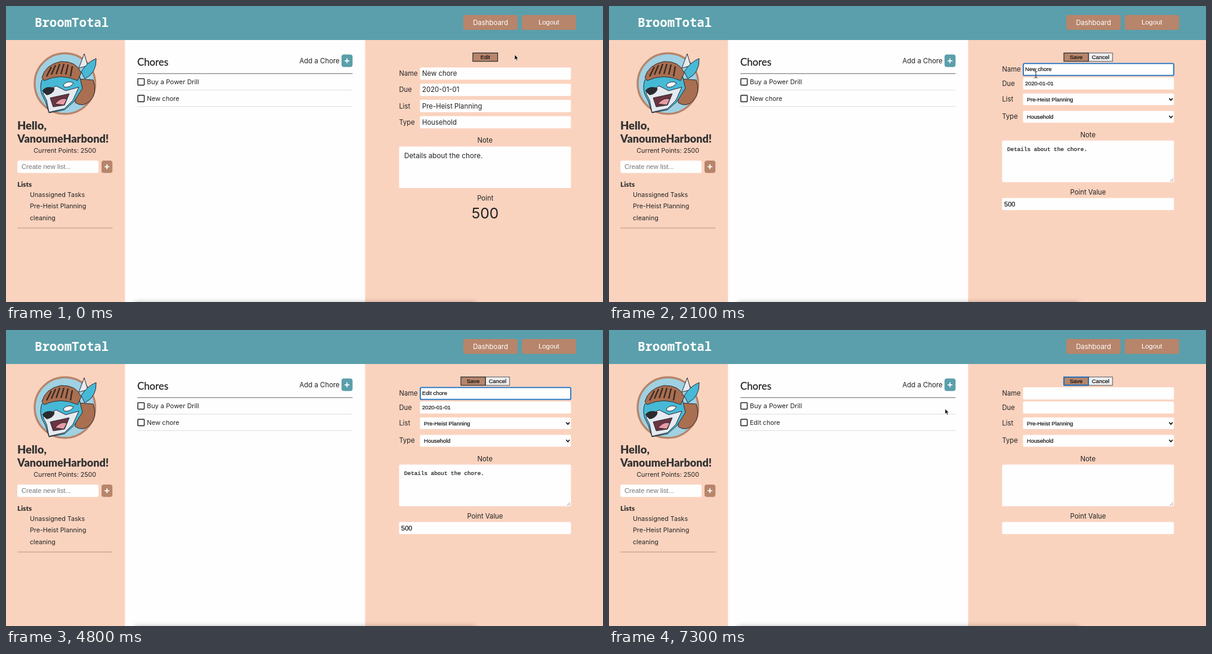
These frames come from a looping animation (1000 by 496 pixels, 7.4 s). An HTML page:

```html
<!DOCTYPE html>
<html lang="en">
<head>
<meta charset="utf-8">
<title>Chore list</title>
<style>
  html, body { margin: 0; width: 100%; height: 100%; overflow: hidden; background: #fad3bf; }
  svg { display: block; width: 100vw; height: 100vh; }
  text { white-space: pre; font-family: Inter, "Open Sans", sans-serif; fill: #222; }
  .arial { font-family: "Liberation Sans", Arial, sans-serif; fill: #111; stroke: #111; stroke-width: .2; }
  .lato { font-family: Lato, sans-serif; stroke: #222; stroke-width: .25; }
  .black { font-family: Lato, sans-serif; font-weight: 900; fill: #333; }
  .mono { font-family: "Liberation Mono", "Courier New", monospace; fill: #111; stroke: #111; stroke-width: .2; }
  .brand { font-family: "Noto Sans Mono", monospace; font-weight: 600; fill: #fff; }
  .white { fill: #fff; }
  .plain { font-family: "Liberation Sans", Arial, sans-serif; fill: #fff; }
  .hint { font-family: "Liberation Sans", Arial, sans-serif; fill: #757575; }
  .mid { text-anchor: middle; }
</style>
</head>
<body>
<svg viewBox="0 0 1000 496" preserveAspectRatio="none">
  <defs><filter id="soft" x="-10%" y="-300%" width="120%" height="700%"><feGaussianBlur stdDeviation="4"/></filter></defs>
  <g id="page"></g>
  <g id="live"></g>
</svg>
<script>
const LOOP = 7400, STEP = 100;
const EDIT_AT = 1000, FOCUS_AT = 2100, SAVE_AT = 6500;
const TEAL = '#5a9fab', BROWN = '#b7856b', ORANGE = '#f57c3e', BLUE = '#1a72c4';

const text = (s, x, y, size, cls = '') =>
  `<text x="${x}" y="${y}" font-size="${size}" class="${cls}">${s}</text>`;
const rect = (x, y, w, h, fill, r = 0, extra = '') =>
  `<rect x="${x}" y="${y}" width="${w}" height="${h}" rx="${r}" fill="${fill}" ${extra}/>`;
const path = (d, color, w, extra = '') =>
  `<path d="${d}" fill="none" stroke="${color}" stroke-width="${w}" ${extra}/>`;
const shape = (d, fill) =>
  `<path d="${d}" fill="${fill}" stroke="#2b2a30" stroke-width="1" stroke-linejoin="round"/>`;
const field = (x, y, w, h) => rect(x, y, w, h, '#fffefe', 2);
const plus = (x, y) => path(`M${x - 4} ${y}h8M${x} ${y - 4}v8`, '#fff', 1.8);
const button = (x, w, fill, label, border = '#333') =>
  rect(x, 78.7, w, 14, fill, 0, `stroke="${border}" stroke-width="1.3"`) +
  text(label, x + w / 2, 89, 9.4, 'arial mid');

// simple helmeted animal in a round frame
function drawAvatar() {
  const cyan = '#46b9d6', pale = '#e4eaf0', leather = '#a96f50';
  return `<circle cx="98.7" cy="130" r="50.7" fill="#9fd1e3" stroke="${BROWN}" stroke-width="3.4"/>` +
    shape('M118 122L146 124Q154 146 140 160Q128 170 116 162Z', leather) +
    shape('M122 104L131 80L137 100Z', pale) +
    shape('M126 110Q136 94 151 88Q152 112 132 122Z', cyan) +
    shape('M60 124L78 112H122L128 138L114 160L98 174L72 179L66 160L60 148Q56 136 60 124Z', cyan) +
    shape('M62 146L84 134L100 142L122 136L112 158L98 172L72 178L68 158Z', pale) +
    shape('M74 154L106 147L98 166L79 169Z', '#6b3440') +
    shape('M82 164Q92 152 102 156L97 166Z', '#e79aa5') +
    shape('M61 142Q68 133 81 138Q80 147 68 149Z', '#2b2a30') +
    shape('M96 132Q104 124 113 129Q108 137 98 136Z', '#fff') +
    shape('M60 120Q66 98 92 93Q118 92 126 112L120 125Q92 112 64 125Z', leather) +
    path('M68 118l8-16M76 115l7-16M84 114l6-17M92 114l5-17M100 115l4-17M108 118l3-17', '#3a2a26', 2.4);
}

function drawPage() {
  const check = y => rect(220.8, y, 10.8, 10.8, '#fff', 1, 'stroke="#333" stroke-width="1.6"');
  const row = y => path(`M220 ${y}H580.5`, '#dedede', 1);
  return rect(0, 0, 1000, 496, '#fad3bf') +
    rect(199.3, 57, 402.2, 439, '#fffefe') +
    rect(0, 0, 1000, 57, TEAL) +
    text('BroomTotal', 48, 35, 20.7, 'brand') +
    rect(766, 15, 91, 25, BROWN, 3) + text('Dashboard', 811.5, 31.7, 11.4, 'white mid') +
    rect(864, 15, 91, 25, BROWN, 3) + text('Logout', 909.3, 31, 11.4, 'plain mid') +
    // sidebar
    drawAvatar() +
    text('Hello,', 19, 206.5, 18.5, 'black') +
    text('VanoumeHarbond!', 19, 229, 18, 'black') +
    text('Current Points: 2500', 98.7, 246, 10.7, 'mid') +
    rect(19, 259, 136, 20.7, '#fffefe', 3) + text('Create new list...', 26, 273, 11.1, 'hint') +
    rect(160, 259, 18.3, 20.7, BROWN, 4) + plus(169.1, 269.3) +
    text('Lists', 19, 303, 11.7, 'black') +
    ['Unassigned Tasks', 'Pre-Heist Planning', 'cleaning']
      .map((s, i) => text(s, 40, 319.5 + i * 19.6, 10.7)).join('') +
    path('M19 372H178.5', '#bb937f', 1.2) +
    // chore list
    text('Chores', 220, 100, 16.8, 'lato') +
    text('Add a Chore', 491.5, 96.3, 11.4) +
    rect(562, 81.3, 18.5, 21, TEAL, 4) + plus(571.2, 91.8) +
    path('M220 113.2H580.5', '#666', 1.1) +
    check(121.8) + text('Buy a Power Drill', 236, 131.2, 10.9) + row(141) +
    check(149.6) + row(168.6) +
    rect(214, 497, 574, 12, '#000', 5, 'opacity=".34" filter="url(#soft)"');
}

function drawView(hover) {
  const rows = [['Name', 'New chore'], ['Due', '2020-01-01'],
    ['List', 'Pre-Heist Planning'], ['Type', 'Household']];
  return button(782, 41.5, hover ? ORANGE : BROWN, 'Edit') +
    rows.map(([k, v], i) => {
      const y = 103 + i * 27.15;
      return text(k, 658.5, y + 14.2, 11.2) + field(693.5, y, 252.8, 20.6) + text(v, 697, y + 14.2, 11.4);
    }).join('') +
    text('Note', 802.3, 229.2, 11.3, 'mid') +
    field(658.5, 235.5, 287.8, 69.5) + text('Details about the chore.', 667, 254.5, 11.7) +
    text('Point', 802.8, 325.7, 11.4, 'mid') + text('500', 802.5, 355.5, 24.6, 'mid');
}

function drawForm(t, name, hover) {
  const saved = t >= SAVE_AT, full = s => saved ? '' : s;
  const select = (y, label) => field(693.5, y, 252.8, 19.6) + text(label, 700, y + 13.2, 9.3, 'arial') +
    path(`M938.3 ${y + 8.2}l2.9 3.2 2.9-3.2`, '#111', 1.7);
  const ring = (x, y, w, h) => rect(x, y, w, h, 'none', 2, `stroke="${BLUE}" stroke-width="1.8"`);
  return button(803.3, 40.2, '#efefef', 'Cancel', '#777') +
    button(762, 41, hover ? ORANGE : BROWN, 'Save') +
    (saved ? ring(762, 78.9, 41, 13.6) : '') +
    [['Name', 110.2], ['Due', 133.7], ['List', 160], ['Type', 189.4]]
      .map(([s, y]) => text(s, 658.5, y, 11.2)).join('') +
    field(693.5, 96, 252.8, 20.4) + text(full(name), 697, 109.4, 9.3, 'arial') +
    (t >= FOCUS_AT && !saved ? ring(694, 96.4, 252, 20) : '') +
    field(693.5, 119.7, 252.8, 20.4) + text(full('2020-01-01'), 697, 133.2, 9.35, 'arial') +
    select(146.5, 'Pre-Heist Planning') + select(175.8, 'Household') +
    text('Note', 802.3, 219.5, 11.3, 'mid') +
    field(658.5, 225.5, 287.8, 69.7) + text(full('Details about the chore.'), 667, 242.6, 9.3, 'mono') +
    path('M940 294l5-5M943 294l2-2', '#777', .8) +
    text('Point Value', 802.5, 316.3, 11.3, 'mid') +
    field(658.5, 321.8, 287.8, 20.2) + text(full('500'), 662, 335.8, 11.1, 'arial');
}

// [time, x, y] of the pointer
const moves = [[0, 852, 81.5], [200, 852, 81.5], [800, 799, 86], [1400, 799, 86],
  [2000, 715, 115], [4900, 715, 115], [5600, 747, 56.5], [6200, 774, 83],
  [6600, 774, 83], [7200, 563, 132], [7400, 563, 132]];

function pointerAt(t) {
  const i = moves.findIndex(m => m[0] > t);
  const [t0, x0, y0] = moves[i - 1], [t1, x1, y1] = moves[i];
  const p = (t - t0) / (t1 - t0), e = p * p * (3 - 2 * p);
  return [x0 + (x1 - x0) * e, y0 + (y1 - y0) * e];
}

function nameAt(t) {
  if (t < 4200) {
    const gone = Math.max(0, Math.floor((t - 3300) / 200));
    return 'New'.slice(0, Math.max(0, 3 - gone)) + ' chore';
  }
  return 'Edit'.slice(0, Math.floor((t - 4200) / 150) + 1) + ' chore';
}

function drawPointer(t, x, y) {
  if (t >= 3300 && t < 5000) return ''; // hidden while typing
  const beam = t >= EDIT_AT && x > 693 && x < 946 && y > 96 && y < 141;
  const at = `transform="translate(${x} ${y})"`;
  return beam
    ? path('M-2.5-5.5Q0-5.5 0-4Q0-5.5 2.5-5.5M0-4V4M-2.5 5.5Q0 5.5 0 4Q0 5.5 2.5 5.5', '#222', 1, at)
    : `<path d="M0 0V8.8L2 7L3.5 10.3L5 9.6L3.6 6.4H6.2Z" fill="#000" stroke="#fff" stroke-width=".7" ${at}/>`;
}

const page = document.getElementById('page'), live = document.getElementById('live');
page.innerHTML = drawPage();
const start = performance.now();
let last = -1;

function frame() {
  const t = Math.floor((performance.now() - start) % LOOP / STEP) * STEP;
  if (t !== last) {
    last = t;
    const [x, y] = pointerAt(t), editing = t >= EDIT_AT;
    const hover = y > 78 && y < 93 && (editing ? x > 761 && x < 803 : x > 781 && x < 824);
    live.innerHTML = text(t < SAVE_AT ? 'New chore' : 'Edit chore', 236, 159, 10.6) +
      (editing ? drawForm(t, nameAt(t), hover) : drawView(hover)) + drawPointer(t, x, y);
  }
  requestAnimationFrame(frame);
}
frame();
</script>
</body>
</html>
```
